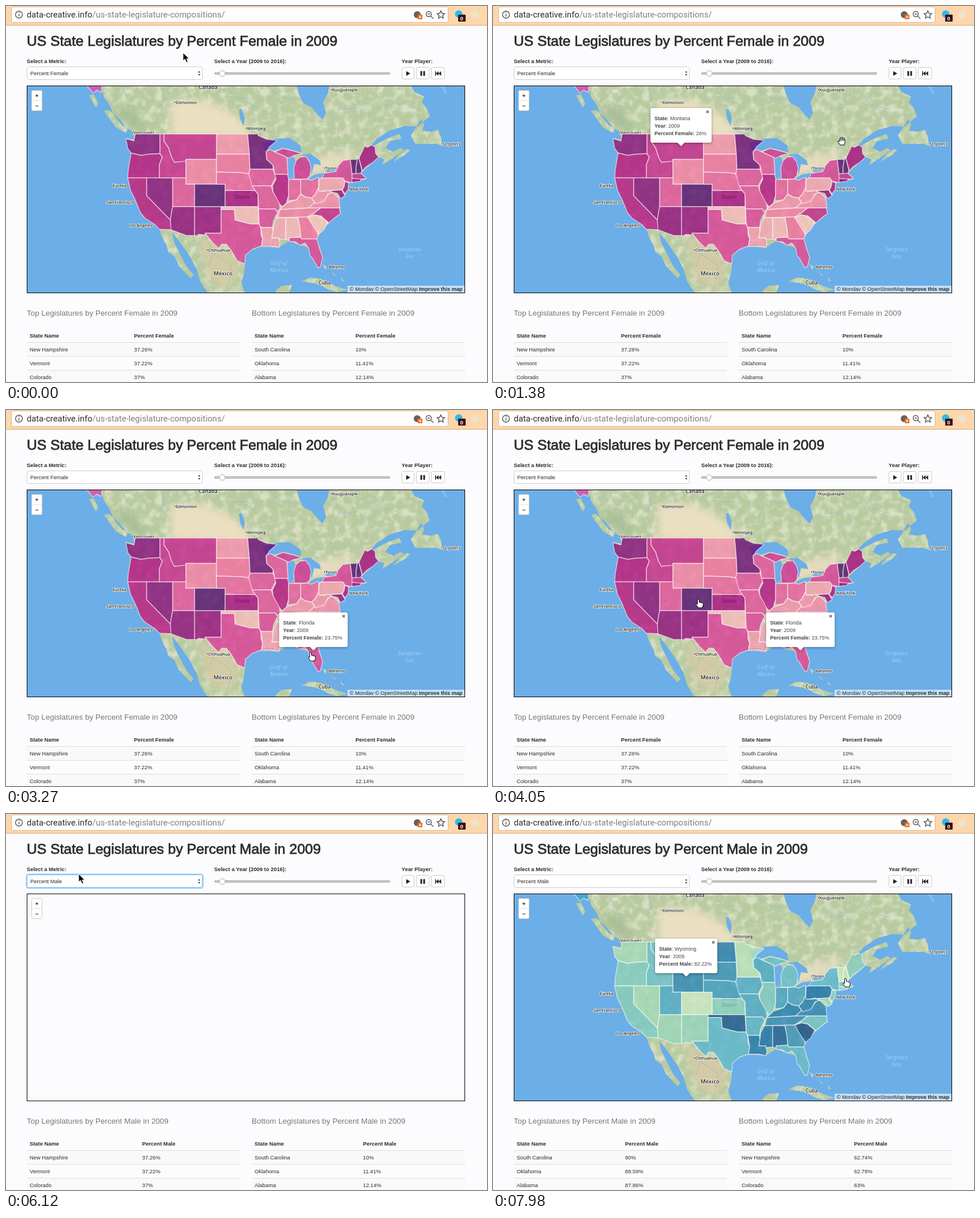
An HTML page that plays this animation: 834 by 652 pixels, repeating every 8000 ms.

```html
<!DOCTYPE html>
<html lang="en">
<head>
<meta charset="utf-8">
<title>State legislatures map</title>
<style>
html, body { margin: 0; width: 100%; height: 100%; overflow: hidden; background: #fcfcff; }
svg { position: absolute; left: 0; top: 0; width: 834px; height: 652px; }
#overlay { will-change: transform; }
text { font: 9.35px "Liberation Sans", Arial, sans-serif; fill: #2c2c2c; white-space: pre; }
.bold { font-weight: bold; }
.title { font-size: 24.6px; stroke: #2c2c2c; stroke-width: .8; }
.heading { font-size: 13.4px; fill: #777; }
.url { font: 14.7px Roboto, sans-serif; }
.place text { font: 600 7.2px "Open Sans", "Noto Sans", sans-serif; fill: #222; stroke: #f6f6ee; stroke-width: 1.6; paint-order: stroke; }
.place .sea { font: italic 8.5px "Noto Serif", serif; fill: #a6d4f4; stroke: none; letter-spacing: .5px; }
.place .country { font-size: 8.5px; fill: #603070; stroke: none; }
.box { fill: #fff; stroke: #ccc; }
#states path { stroke: #fff; stroke-opacity: .55; stroke-width: 1.5; stroke-linejoin: round; fill: var(--female); fill-opacity: .75; }
#states.male path { fill: var(--male); }
#popup text { font-size: 9px; fill: #444; }
#menu text { font-size: 9.6px; }
</style>
</head>
<body>
<svg id="page" viewBox="0 0 834 652">
  <defs>
    <clipPath id="mapBox"><rect x="37" y="139" width="758" height="358"/></clipPath>
    <clipPath id="landClip"><use href="#land"/></clipPath>
    <filter id="soft"><feGaussianBlur stdDeviation="7"/></filter>
    <filter id="mottle" x="0" y="0" width="1" height="1">
      <feTurbulence type="fractalNoise" baseFrequency=".07" numOctaves="4" seed="4"/>
      <feColorMatrix values="0 0 0 0 .87 0 0 0 0 .86 0 0 0 0 .71 3 0 0 0 -1.3"/>
    </filter>
  </defs>

  <rect width="834" height="33" fill="#fdd6ac"/>
  <path d="M0 33.5H834" stroke="#d6aa78"/>
  <rect x="9.5" y="1.5" width="757" height="27" rx="3" fill="#fefefe" stroke="#dcb488"/>
  <g fill="none" stroke="#555" stroke-width="1.4">
    <circle cx="22.500" cy="15" r="6"/><path d="M22.500 14v4.500M22.500 11v1.600"/>
    <circle cx="733" cy="14" r="4.500"/><path d="M736 17l5 5M731 14h4"/>
    <path d="M754 8.500l2 4.300 4.600.5-3.500 3.200 1 4.600-4.100-2.400-4.100 2.400 1-4.600-3.500-3.200 4.600-.5z"/>
  </g>
  <text class="url" x="36" y="20">data-creative.info<tspan fill="#808080">/us-state-legislature-compositions/</tspan></text>
  <circle cx="713" cy="15" r="6" fill="#6a6058"/><rect x="714" y="15" width="8" height="8" fill="#f27320"/>
  <path d="M716 17l4 4m0-4l-4 4" stroke="#fff"/>
  <circle cx="785" cy="14" r="6.500" fill="#2cbce6"/><rect x="784" y="15" width="13" height="12" rx="1" fill="#3c1018"/>
  <text class="bold" x="787.500" y="25" style="fill:#fff">0</text>
  <circle cx="813" cy="15" r="7" fill="#eee2c8"/>

  <text class="title" x="36" y="69">US State Legislatures by <tspan class="metric"></tspan> in 2009</text>
  <text class="bold" x="36" y="99">Select a Metric:</text>
  <text class="bold" x="361" y="99">Select a Year (2009 to 2016):</text>
  <text class="bold" x="686" y="99">Year Player:</text>
  <rect id="focus" x="35.500" y="104.500" width="306" height="24" rx="4" fill="none" stroke="#b4dcf6" stroke-width="3"/>
  <rect id="select" class="box" x="36.500" y="105.500" width="304" height="22" rx="3"/>
  <text class="metric" x="42" y="120"></text>
  <path d="M333 115.500l2-3 2 3zm0 2.500l2 3 2-3z" fill="#444"/>
  <rect x="361.500" y="115.500" width="304" height="3" rx="1.500" fill="#ccc" stroke="#aaa"/>
  <circle cx="375" cy="117" r="5" fill="#fff" stroke="#aaa"/>
  <rect class="box" x="686.500" y="106.500" width="21" height="20" rx="2"/>
  <rect class="box" x="711.500" y="106.500" width="22" height="20" rx="2"/>
  <rect class="box" x="737.500" y="106.500" width="23" height="20" rx="2"/>
  <path d="M694 113v8l7-4zM718.500 113h3v8h-3zm5 0h3v8h-3zM744 113h1.500v8H744zm6 0v8l-4.500-4zm4.500 0v8l-4.500-4z" fill="#222"/>

  <g id="map" clip-path="url(#mapBox)">
    <rect x="37" y="139" width="758" height="358" fill="#6caee8"/>
    <path id="land" fill="#b8caa0" d="M164 138L170 158 180 172 186 188 200 206 218 217 224 232 209 229 211 247 217 255 212 284 211 298 216 320 224 336 233 358 240 367 258 379 266 387 271 402 279 416 281 426 292 434 300 451 320 472 325 466 313 452 303 433 292 411 288 392 302 410 318 433 330 455 337 478 350 498H414L408 480 413 462 414 447 415 432 427 422 443 416 473 419 491 407 510 415 525 419 533 440 541 454 549 436 539 404 548 388 560 376 580 360 577 333 588 329 594 307 625 300 616 289 646 262 656 266 652 276 672 263 690 250 684 246 671 253 658 246 666 234 686 230 682 222 660 230 640 241 625 252 642 231 665 216 692 208 714 209 735 191 729 176 721 167 725 157 708 149 702 138H561L558 152 550 166 555 185 549 197 540 188 530 176 515 168 508 153 504 138Z
      M144 155l8-2 8 16-4 7zM170 182l8-2 17 14 16 20-3 6-17-9zM702 225l18-29 5 10-3 10 14 2 13-3 5 11 2 17-10-4-14 0-22 0zM672 270l20-12 9-8-6-2-12 8zM512 478l14-7 20 2 24 12 22 7-18 4-17-5-9-6-18-5zM468 493l10-8 18-1-5 14h-23zM548 447l8 5-2 6zM563 459l10 9-4-1zM580 470l7 8-5-2z"/>
    <g clip-path="url(#landClip)">
      <rect x="37" y="139" width="758" height="358" filter="url(#mottle)" opacity=".6"/>
      <g filter="url(#soft)">
        <path d="M286 165L345 163 390 184 424 212 420 230 285 226Z" fill="#eadfc0"/>
        <path d="M525 272L560 258 612 250 570 284 530 296Z" fill="#e6dcc0"/>
        <path d="M335 395L385 425 405 455 385 490 350 470Z" fill="#d4caa4"/>
        <path d="M205 170L245 210 230 218 190 185Z" fill="#a8be94"/>
      </g>
      <path d="M445 238L470 230 492 229 511 242 512 254 497 250 480 246 462 252 450 250ZM488 263L498 261 503 270 499 285 500 301 489 300ZM511 258L528 256 544 268 546 276 534 274 530 292 527 283 522 263ZM523 300L536 292 555 289 548 298 534 303ZM553 285L572 280 575 286 558 289ZM404 180L408 178 414 194 412 208 406 196Z" fill="#6caee8"/>
      <path d="M200 139L220 175 226 208M268 139L275 159 268 176M380 138L400 160 420 158 428 175M455 139L480 160 502 163M575 180L610 176 632 190M640 150L651 169 689 180M345 399L360 425 352 453M360 430L391 451 385 485" fill="none" stroke="#92bcd0" stroke-width=".8"/>
    </g>
    <g class="place">
      <text x="334" y="144" style="font-size:9px">Canada</text>
      <text x="292" y="170">•Edmonton</text><text x="563" y="148">•Kuujjuarapik</text>
      <text x="218" y="222">•Vancouver</text><text x="415" y="215">•Winnipeg</text>
      <text x="757" y="242">St. John's</text><text x="551" y="284">•Toron</text>
      <text x="492" y="303">C</text><text x="185" y="314">Eureka</text>
      <text x="174" y="343">San Francisco•</text><text x="213" y="383">Los Angeles•</text>
      <text x="595" y="320">New York</text><text x="440" y="417">ouston</text>
      <text x="348" y="426">•Chihuahua</text><text x="360" y="467" style="font-size:9.500px">México</text>
      <text x="542" y="483" style="font-size:8.500px">Cuba</text><text x="560" y="455" style="font-size:6.300px">Bahamas</text>
      <text class="sea" x="458" y="449">Gulf of</text><text class="sea" x="458" y="461">Mexico</text>
      <text class="sea" x="680" y="425">Sargasso</text><text class="sea" x="692" y="437">Sea</text>
      <text class="sea" transform="translate(754 139) rotate(62)">Sea</text>
      <text class="country" x="396" y="323">United</text><text class="country" x="397" y="334">States</text>
    </g>
    <g id="states">
      <path data-female="21.7" d="M140 138h27l-2 12-8-4-6 5z"/>
      <path data-female="32" d="M208 230L222 234 224 222H267V256L247 257 234 259 217 255 211 247Z"/>
      <path data-female="28" d="M217 255L234 259 247 257 267 256 271 262 266 275V298H211L212 284Z"/>
      <path data-female="27.5" d="M211 298H244V329L285 371 287 388 266 387 258 379 240 367 233 358 224 336 216 320Z"/>
      <path data-female="32" d="M244 298H289V348L287 358 285 371 244 329Z"/>
      <path data-female="25.7" d="M267 222H274V234L282 246 287 262 292 271 312 268V298H266V275L271 262 267 256Z"/>
      <path data-female="26" d="M274 222H365V266H312V269L292 271 287 262 282 246 274 234Z"/>
      <path data-female="17.78" d="M312 266H365V309H312Z"/>
      <path data-female="22.1" d="M289 298H312V309H327V348H289Z"/>
      <path data-female="37" d="M327 309H380V348H327Z"/>
      <path data-female="31" d="M289 348H327V398H313L286 388 285 371 287 358Z"/>
      <path data-female="30.4" d="M327 348H373V394H345L347 397 333 396V398H327Z"/>
      <path data-female="16.3" d="M365 222H419L422 257H365Z"/>
      <path data-female="19" d="M365 257H422L423 284 421 291 407 289 365 288Z"/>
      <path data-female="20.4" d="M365 288L407 289 421 291 427 303 432 320H380V309H365Z"/>
      <path data-female="29" d="M380 320H432L437 326V348H380Z"/>
      <path data-female="11.41" d="M373 348H437L439 378 424 378 408 374 397 371 396 353H373Z"/>
      <path data-female="23.7" d="M373 353H396L397 371 408 374 424 378H439L442 387V396L445 404 443 416 427 422 415 432 414 447 401 442 392 426 382 413 374 413 369 420 359 411 345 394H373Z"/>
      <path data-female="34.6" d="M419 222H434V219L438 225 452 231 470 233 457 244 451 254 452 266 463 276V283H423L422 257Z"/>
      <path data-female="22.2" d="M423 283H463L468 296 460 312H427L421 291Z"/>
      <path data-female="22" d="M427 312H460L463 322 474 338 475 352 470 357 467 352H438L437 326 432 320Z"/>
      <path data-female="23.2" d="M438 352H467L471 358 464 372 462 384H442L439 378Z"/>
      <path data-female="15.3" d="M442 384H462L463 392 461 402H473L475 412 473 419 460 416H443L445 404Z"/>
      <path data-female="22" d="M451 252L458 249 466 253 480 259 487 262 489 292H466L463 276 452 266Z"/>
      <path data-female="27.7" d="M466 292H488L490 300V328L486 342 479 348 475 344 463 322 462 312 468 300Z"/>
      <path data-female="25" d="M500 300L499 280 503 268 510 262 520 261 526 270 529 281 527 294 522 300ZM466 253L480 247 497 251 513 256 500 259 490 264 480 259Z"/>
      <path data-female="21" d="M490 301H511V326L504 336 489 338 490 328Z"/>
      <path data-female="21" d="M511 301L522 300 530 302 542 297V315L536 327 530 333 519 331 511 326Z"/>
      <path data-female="16" d="M475 353L486 342 504 336 511 326 519 331 530 333 535 341 525 350Z"/>
      <path data-female="18" d="M471 367L475 353 546 349 536 358 523 366Z"/>
      <path data-female="14.4" d="M471 367H485V404L473 405V402H461L463 390 464 380Z"/>
      <path data-female="12.14" d="M485 367H506L510 386 511 401 491 402V406L485 404Z"/>
      <path data-female="19.2" d="M506 366H523L539 383 541 398 539 404H513L511 401 510 386Z"/>
      <path data-female="23.75" d="M491 402L511 401 513 404H539L543 418 549 436 545 452 541 454 533 440 527 432 525 420 518 411 510 415 502 409 491 408Z"/>
      <path data-female="10" d="M523 366L534 362 545 364 558 375 551 388 542 396 530 378Z"/>
      <path data-female="26" d="M536 358L546 350H578L580 360 570 367 560 376 546 364 534 362 523 366Z"/>
      <path data-female="17" d="M525 350L535 341 552 336 560 325 566 323 577 333 579 350Z"/>
      <path data-female="16.4" d="M530 333L536 327 542 315 545 321H552L558 319 566 323 558 326 552 338 537 343Z"/>
      <path data-female="14.6" d="M543 300L548 298H584L588 304 586 314 582 319 542 321Z"/>
      <path data-female="24" d="M548 298L552 290 572 287 576 277 584 268 597 266 601 300 610 301 599 306 588 304 584 298Z"/>
      <path data-female="28.5" d="M588 304L594 307 593 318 588 326 583 319 586 314Z"/>
      <path data-female="31" d="M552 321L582 319 588 329 580 334 575 325 566 323 558 319Z"/>
      <path data-female="37.22" d="M597 266H609L607 279V291H600Z"/>
      <path data-female="37.26" d="M609 266L612 264 617 285 615 291H607V279Z"/>
      <path data-female="29" d="M612 264L622 243 627 245 634 241 640 245 641 256 646 262 636 271 624 279 618 286Z"/>
      <path data-female="26" d="M600 291L615 290 625 299 612 301 600 299Z"/>
      <path data-female="31.5" d="M600 299L616 300 614 304 600 306Z"/>
    </g>
    <rect x="592" y="485" width="204" height="12" fill="#fff" opacity=".6"/>
    <text x="596" y="494" style="font-size:9.100px">© Mondav © OpenStreetMap <tspan class="bold">Improve this map</tspan></text>
  </g>
  <rect x="36.500" y="138.500" width="759" height="359" fill="none" stroke="#000"/>
  <rect class="box" x="44.500" y="146.500" width="18" height="35" rx="2"/>
  <path d="M45 164H62" stroke="#ddd"/>
  <path d="M51 155.500h5M53.500 153v5M51 173.500h5" stroke="#222"/>
  <g id="tables"></g>
</svg>

<svg id="overlay" viewBox="0 0 834 652">
  <g id="popup">
    <path id="bubble" fill="#fff" style="filter:drop-shadow(0 1px 2px #0006)"/>
    <text id="stateLine"><tspan class="bold">State</tspan>: <tspan></tspan></text>
    <text id="yearLine"><tspan class="bold">Year</tspan>: 2009</text>
    <text id="valueLine"><tspan class="bold"><tspan class="metric"></tspan>:</tspan> <tspan id="popupValue"></tspan></text>
    <path id="close" d="M-2-2L2 2M2-2L-2 2" stroke="#555" stroke-width="1.300"/>
  </g>
  <g id="menu">
    <rect x="25" y="77" width="307" height="75" rx="4" fill="#fafafa" style="filter:drop-shadow(0 3px 5px #6668)"/>
    <rect id="highlight" x="25" width="307" height="13" fill="#1e90ff"/>
  </g>
  <g id="cursor" stroke-width="1" stroke-linejoin="round">
    <path id="arrow" d="M0 0V14L3.300 11 6 17 8.500 16 6 10.300H10.500Z" fill="#000" stroke="#fff"/>
    <path id="pointer" d="M-1.500 1Q0-1 1.500 1V5L7 6.500Q9 7 8.500 10L7 15H0L-4 9.500Q-4 7-1.500 9Z" fill="#fff" stroke="#000"/>
    <path id="grab" d="M-3 7L-7 1Q-7-1-5 0L-4 1V-4Q-3-6-1.800-4V-6Q-.6-8 .6-6V-5Q1.800-6.600 3-5V-3Q4.200-4.400 5.200-3V3L4 7ZM-1.800-4V0M.6-5V0M3-4V0" fill="#fff" stroke="#000"/>
  </g>
</svg>

<script>
const LOOP = 8000, MENU_OPEN = 4850, CHOSEN = 5670, LOADED = 6350, BLUR = 7050;
const $ = id => document.getElementById(id);
const show = (id, on) => $(id).style.visibility = on ? 'visible' : 'hidden';
const attrs = (el, values) => { for (const k in values) el.setAttribute(k, values[k]); };
const add = (parent, tag, values, text = '') => {
  const el = document.createElementNS('http://www.w3.org/2000/svg', tag);
  attrs(el, values);
  el.textContent = text;
  return parent.appendChild(el);
};

// time, x, y of the cursor's hot spot
const cursorKeys = [
  [0, 307, 81], [150, 307, 81], [650, 325, 245], [900, 325, 245], [1380, 605, 234],
  [1600, 611, 280], [1850, 611, 280], [2460, 545, 390], [2750, 537, 425], [3150, 537, 425],
  [4050, 356, 328], [4250, 356, 328], [4800, 131, 112], [5100, 131, 112], [5450, 126, 104],
  [6300, 126, 104], [6900, 335, 290], [7200, 335, 290], [7980, 611, 285], [8000, 611, 285]
];
const popups = [
  { at: 780, end: CHOSEN, name: 'Montana', value: '26%', x: 326, y: 242, w: 106 },
  { at: 1720, end: CHOSEN, name: 'New Hampshire', value: '37.26%', x: 610, y: 280, w: 119 },
  { at: 2950, end: CHOSEN, name: 'Florida', value: '23.75%', x: 533, y: 416, w: 119 },
  { at: 4120, end: CHOSEN, name: 'Colorado', value: '37%', x: 354, y: 324, w: 106 },
  { at: 7050, end: LOOP, name: 'Wyoming', value: '82.22%', x: 335, y: 281, w: 108 }
];
const high = ['New Hampshire', 'Vermont', 'Colorado'], low = ['South Carolina', 'Oklahoma', 'Alabama'];
const femaleTop = ['37.26%', '37.22%', '37%'], femaleBottom = ['10%', '11.41%', '12.14%'];
const maleTop = ['90%', '88.59%', '87.86%'], maleBottom = ['62.74%', '62.78%', '63%'];

const pinks = ['#fcc5c0', '#fa9fb5', '#f768a1', '#dd3497', '#ae017e', '#7a0177', '#49006a'];
const blues = ['#ccebc5', '#a8ddb5', '#7bccc4', '#4eb3d3', '#2b8cbe', '#0868ac', '#084081'];
function ramp(colors, level) {
  const p = level * (colors.length - 1), i = Math.min(Math.floor(p), colors.length - 2);
  return `color-mix(in srgb, ${colors[i + 1]} ${(p - i) * 100}%, ${colors[i]})`;
}
const states = [...document.querySelectorAll('#states path')];
for (const state of states) {
  const level = (state.dataset.female - 10) / 27.26;
  state.style.setProperty('--female', ramp(pinks, level));
  state.style.setProperty('--male', ramp(blues, 1 - level));
}

function makeTable(x, label) {
  const root = $('tables');
  const heading = add(root, 'text', { class: 'heading', x, y: 537 }, label + ' Legislatures by ');
  add(heading, 'tspan', { class: 'metric' });
  heading.append(' in 2009');
  [583, 632].forEach(y => add(root, 'rect', { x, y, width: 370, height: 25, fill: '#f9f9f9' }));
  [583.5, 607.5, 631.5].forEach(y => add(root, 'path', { d: `M${x} ${y}h370`, stroke: '#ddd' }));
  add(root, 'text', { class: 'bold', x: x + 5, y: 575 }, 'State Name');
  const header = add(root, 'text', { class: 'bold metric', y: 575 });
  const rows = [599, 623, 647].map(y => [add(root, 'text', { x: x + 5, y }), add(root, 'text', { y })]);
  return (names, values, column) => {
    header.setAttribute('x', column);
    rows.forEach(([name, value], i) => {
      name.textContent = names[i];
      value.textContent = values[i];
      value.setAttribute('x', column);
    });
  };
}
const setTop = makeTable(36, 'Top'), setBottom = makeTable(426, 'Bottom');

const options = ['Size', 'Percent Male', 'Percent Female', 'Percent Democrat', 'Percent Republican']
  .map((label, i) => add($('menu'), 'text', { x: 47, y: 92 + 13 * i }, label));
const check = add($('menu'), 'text', { x: 31, y: 118, style: 'font-family:"DejaVu Sans",sans-serif' }, '✓');
const metrics = document.querySelectorAll('.metric');

function cursorAt(t) {
  const i = cursorKeys.findIndex(key => key[0] > t);
  const [t0, x0, y0] = cursorKeys[i - 1], [t1, x1, y1] = cursorKeys[i];
  const p = (t - t0) / (t1 - t0), e = p * p * (3 - 2 * p);
  return [x0 + (x1 - x0) * e, y0 + (y1 - y0) * e];
}

function drawPopup(t) {
  const p = popups.findLast(p => t >= p.at && t < p.end);
  show('popup', p);
  if (!p) return;
  const left = p.x - p.w / 2, top = p.y - 65, right = left + p.w;
  $('popup').style.opacity = Math.min(1, (t - p.at) / 200);
  $('bubble').setAttribute('d', `M${left + 3} ${top}H${right - 3}q3 0 3 3v54q0 3-3 3H${p.x + 6}l-6 6-6-6H${left + 3}q-3 0-3-3v-54q0-3 3-3z`);
  ['stateLine', 'yearLine', 'valueLine'].forEach((id, i) => attrs($(id), { x: left + 7, y: top + 21 + 13 * i }));
  $('stateLine').lastElementChild.textContent = p.name;
  $('popupValue').textContent = p.value;
  $('close').setAttribute('transform', `translate(${right - 7} ${top + 6.5})`);
}

function drawMenu(t, y) {
  show('menu', t >= MENU_OPEN && t < CHOSEN);
  const row = Math.max(0, Math.min(4, Math.floor((y - 82) / 13)));
  $('highlight').setAttribute('y', 82 + 13 * row);
  options.forEach((option, i) => option.style.fill = i === row ? '#fff' : '#2c2c2c');
  check.style.fill = row === 2 ? '#fff' : '#2c2c2c';
}

const hotSpot = $('page').createSVGPoint();
function drawCursor(x, y, mapVisible) {
  Object.assign(hotSpot, { x, y });
  const overMap = y > 138;
  const overState = overMap && mapVisible && states.some(state => state.isPointInFill(hotSpot));
  show('arrow', !overMap);
  show('pointer', overState);
  show('grab', overMap && !overState);
  $('cursor').setAttribute('transform', `translate(${x} ${y})`);
}

function draw(now) {
  const t = now % LOOP, male = t >= CHOSEN, loaded = t >= LOADED;
  const mapVisible = !male || loaded, focused = male && t < BLUR;
  const [x, y] = cursorAt(t);
  metrics.forEach(el => el.textContent = male ? 'Percent Male' : 'Percent Female');
  show('map', mapVisible);
  $('states').classList.toggle('male', male);
  show('focus', focused);
  $('select').style.stroke = focused ? '#66afe9' : '#ccc';
  if (loaded) {
    setTop(low, maleTop, 229);
    setBottom(high, maleBottom, 626);
  } else {
    setTop(high, femaleTop, male ? 236 : 222);
    setBottom(low, femaleBottom, male ? 619 : 606);
  }
  drawPopup(t);
  drawMenu(t, y);
  drawCursor(x, y, mapVisible);
  requestAnimationFrame(() => draw(performance.now()));
}
draw(performance.now());
</script>
</body>
</html>
```
